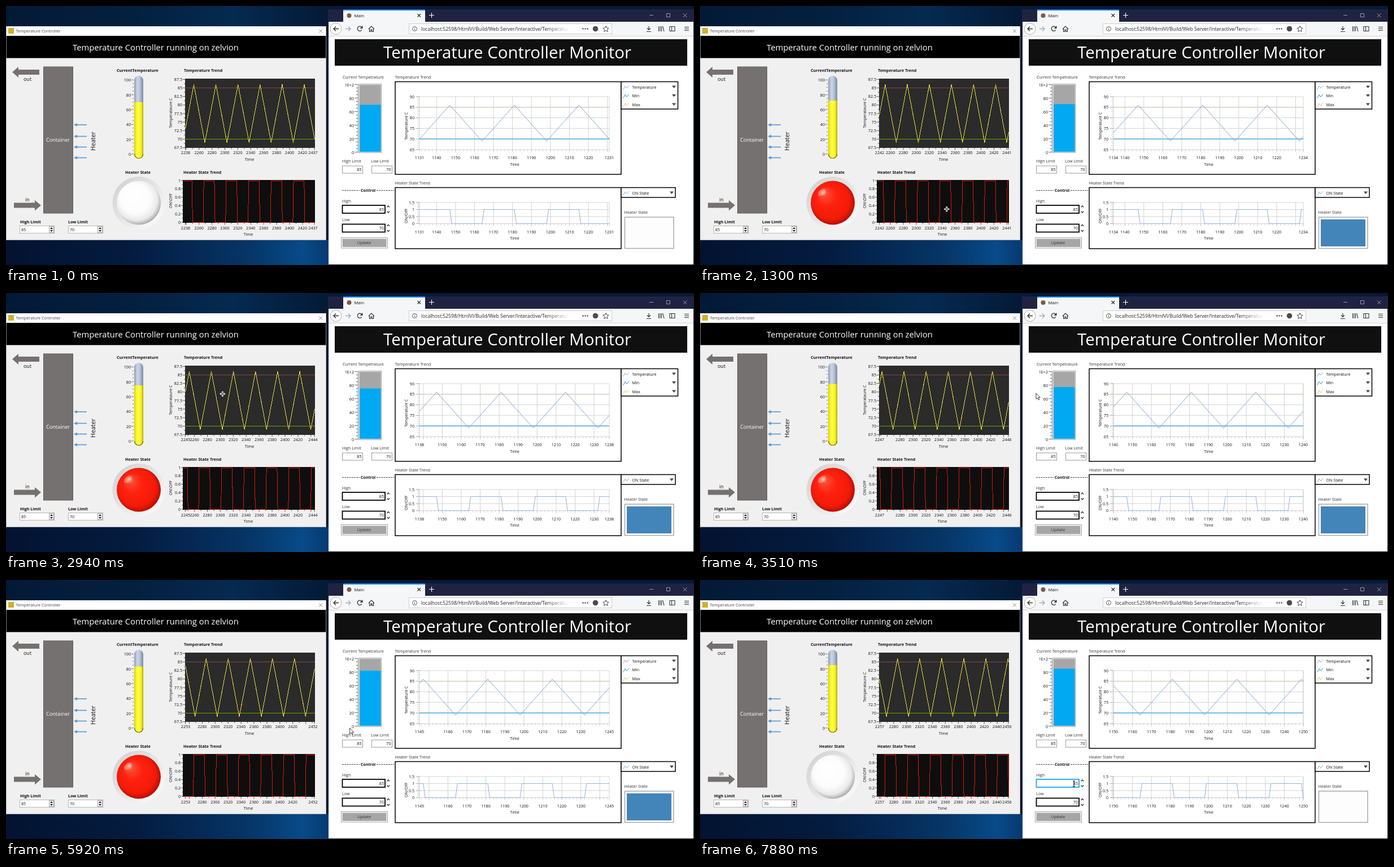
Animation of 1218 by 460 pixels, one loop 8000 ms. Source, as an HTML page:

```html
<!DOCTYPE html>
<html lang="en">
<head>
<meta charset="utf-8">
<title>Temperature Controller</title>
<style>
html, body { margin: 0; width: 100%; height: 100%; overflow: hidden; background: #04132b; }
svg { display: block; width: 1218px; height: 460px; font-family: "Open Sans", "Noto Sans", sans-serif; }
text { white-space: pre; }
.crisp { shape-rendering: crispEdges; }
</style>
</head>
<body>
<svg id="stage" viewBox="0 0 1218 460" xmlns="http://www.w3.org/2000/svg"></svg>
<script>
const LOOP = 8000;
const LAG = 80; // the web page trails the desktop panel
const STEPS = [70, 430, 830, 1270, 1700, 2070, 2560, 2990, 3430, 3830, 4240, 4660, 5050, 5480, 5920, 6380, 6810, 7270, 7710];
const CURSOR = [[990, 520, 438], [1300, 437, 361], [2150, 263, 157], [2510, 223, 180], [3510, 595, 178], [4130, 590, 139],
  [4820, 493, 163], [6220, 640, 290], [6380, 640, 290], [6950, 677, 333], [7490, 662, 362]];

// Sample counters of the two programs differ by a constant.
const OFFSET = 1206;
const temperature = n => { const d = (n - 8) % 34; return 69 + Math.min(d, 34 - d); };
const heater = n => { const d = n % 34; return d > 8 && d < 26 ? 1 : 0; };

// Value-to-pixel scales
const thermoY = v => 262.8 - v * 1.315;
const tankY = v => 259.5 - v * 1.2;
const deskTempY = v => 251.6 - (v - 67.5) * 6.06;

const range = (a, b, step = 1) => Array.from({ length: Math.floor((b - a) / step + 1e-6) + 1 }, (_, i) => a + i * step);
const each = (list, fn) => list.map(fn).join('');
const rect = (x, y, w, h, fill, extra = '') => `<rect x="${x}" y="${y}" width="${w}" height="${h}" fill="${fill}" ${extra}/>`;
const box = (x, y, w, h, stroke, width = 1, fill = '#fff') => rect(x, y, w, h, fill, `stroke="${stroke}" stroke-width="${width}"`);
const path = (d, stroke, width = 1, extra = '') => `<path d="${d}" fill="none" stroke="${stroke}" stroke-width="${width}" ${extra}/>`;
const shape = (d, fill, extra = '') => `<path d="${d}" fill="${fill}" ${extra}/>`;
const label = (x, yMid, str, { size = 7.15, anchor = 'start', fill = '#111', bold = false, turn = false } = {}) =>
  `<text x="${x}" y="${yMid + size * 0.36}" font-size="${size}" text-anchor="${anchor}" fill="${fill}"` +
  `${bold ? ' font-weight="700"' : ''}${turn ? ` transform="rotate(-90 ${x} ${yMid})"` : ''}>${str}</text>`;
const mid = { anchor: 'middle' }, end = { anchor: 'end' }, bold = { bold: true }, upright = { anchor: 'middle', turn: true };
const gradient = (id, stops, attrs, kind = 'linear') => `<${kind}Gradient id="${id}" ${attrs}>` +
  each(stops, ([o, c, a = 1]) => `<stop offset="${o}" stop-color="${c}" stop-opacity="${a}"/>`) + `</${kind}Gradient>`;

const defs = `<defs>
${gradient('sky', [[0, '#031a36'], [.4, '#04203f'], [.7, '#052a50'], [1, '#041a36']], '')}
${gradient('floor', [[0, '#031330'], [.4, '#041c40'], [.75, '#063566'], [.92, '#084a88'], [1, '#063a70']], '')}
${gradient('ring', [[0, '#cfcfcf'], [.45, '#e3e3e3'], [1, '#ffffff']], 'x1="0" y1="0" x2="1" y2="1"')}
${gradient('red', [[0, '#ffb09a'], [.13, '#ff4a30'], [.4, '#ff2110'], [.78, '#f21a08'], [1, '#980a00']], 'cx=".5" cy=".5" r=".56" fx=".27" fy=".25"', 'radial')}
${gradient('white', [[0, '#ffffff'], [.6, '#fcfcfc'], [.84, '#eaeaea'], [1, '#a8a8a8']], 'cx=".46" cy=".44" r=".57" fx=".36" fy=".33"', 'radial')}
${gradient('glass', [[0, '#8f9cb2'], [.35, '#cbd6e8'], [.6, '#b9c6dc'], [1, '#7c889e']], '')}
${gradient('yellow', [[0, '#d0c800'], [.2, '#f9f428'], [.5, '#ffff48'], [.8, '#f6ec10'], [1, '#aaa000']], '')}
${gradient('fade', [[0, '#fff', 0], [1, '#fff']], '')}
<clipPath id="tube">${rect(227, 124, 16, 147, '#000', 'rx="8"')}</clipPath>
</defs>`;

const desktop = rect(0, 0, 1218, 460, '#04132b') + rect(0, 0, 571, 36, 'url(#sky)') + rect(0, 416, 571, 44, 'url(#floor)') +
  rect(570, 0, 648, 6, '#041a38');

function stepper(x, y, value) {
  return box(x + .5, y + .5, 61, 13, '#b5b5b5') + label(x + 3, y + 7, value) +
    box(x + 52.5, y + 1.5, 8, 11, '#aaa', 1, '#eee') +
    shape(`M${x + 54} ${y + 6}h5l-2.5 -3zM${x + 54} ${y + 8}h5l-2.5 3z`, '#222');
}

function panel() {
  const arrow = y => path(`M143 ${y}H123`, '#5b9bd5', 1.7) + shape(`M120 ${y}l6 -3v6z`, '#5b9bd5');
  return rect(0, 36, 567, 380, '#f0f0f0') + rect(0, 36, 567, 17, '#fff') + rect(4, 39, 10, 10, '#d0b02c') +
    label(17.5, 44.5, 'Temperature Controller', { size: 7.25, fill: '#444' }) +
    path('M554 41.5l6 6m0 -6l-6 6', '#777', .9) +
    rect(0, 53, 567, 39.5, '#000') +
    label(118, 74, 'Temperature Controller running on zelvion', { size: 14.8, fill: '#fff' }) +
    rect(66.5, 108, 52, 260, '#767171', 'stroke="#635e5e"') +
    label(92, 238, 'Container', { ...mid, size: 9.2, fill: '#fff' }) +
    shape('M11 117.5L22 108v5H59v9H22v5z', '#767171') + label(38, 130, 'out', { ...mid, size: 9 }) +
    shape('M62 354L51 345v4.5H14v9H51v5z', '#767171') + label(38, 343.5, 'in', { ...mid, size: 9 }) +
    each([211, 231.5, 250.5, 269.5], arrow) +
    label(154.5, 240, 'Heater', { ...upright, size: 10.7 }) +
    label(196, 114.5, 'CurrentTemperature', bold) +
    each(range(0, 100, 20), v => label(221, thermoY(v) + .5, v, end)) +
    path(each(range(0, 100, 5), v => `M${v % 20 ? 224 : 222} ${thermoY(v)}H226`), '#555', .8) +
    rect(227, 124, 16, 147, 'url(#glass)', 'rx="8"') +
    '<g clip-path="url(#tube)"><rect id="mercury" x="227" width="16" fill="url(#yellow)"/></g>' +
    path('M227.5 263a7.5 7.5 0 0 0 15 0', '#6d6700', 1.2) +
    label(211, 295, 'Heater State', bold) +
    '<circle cx="235" cy="349.5" r="46.5" fill="url(#ring)"/><circle id="bulb" cx="235" cy="349.5" r="39"/>' +
    '<ellipse cx="216" cy="331" rx="8" ry="5" fill="#fff" opacity=".3" transform="rotate(-40 216 331)"/>' +
    label(25, 383.5, 'High Limit', bold) + stepper(24, 390, 85) +
    label(110, 383.5, 'Low Limit', bold) + stepper(110, 390, 70) +
    label(315, 114.5, 'Temperature Trend', bold) + label(291, 190, 'Temperataure C', upright) +
    rect(317, 129, 230, 123, '#2b2b2b') +
    each(range(67.5, 87.5, 2.5), v => label(312, deskTempY(v), v, end)) +
    path(each(range(67.5, 87.5, 1.25), v => `M${v % 2.5 ? 315 : 313} ${deskTempY(v)}H317`), '#333', .8) +
    path(`M317 ${deskTempY(85)}H547`, '#84484a', 1, 'class="crisp"') +
    path(`M317 ${deskTempY(70)}H547`, '#62a800', 1, 'class="crisp"') +
    path('', '#e0d840', 1, 'id="deskTemp" class="crisp"') + label(431, 272, 'Time', mid) +
    label(314, 295, 'Heater State Trend', bold) + label(291, 346, 'ON\\OFF', upright) +
    rect(313, 309, 234, 76, '#0e0e0e') +
    each(range(0, 5), i => label(309, 384 - i * 14.8, i / 5, end)) +
    path(each(range(0, 10), i => `M${i % 2 ? 311.5 : 310} ${384 - i * 7.4}H313`), '#333', .8) +
    path('', '#e0140c', 1, 'id="deskState" class="crisp"') + label(429, 405, 'Time', mid) +
    '<g id="deskAxis"></g>' + path('M566.5 36V416M0 415.5H567M.5 36V416', '#9aa2ab', .8);
}

function browser() {
  const ink = '#333';
  return rect(571, 6, 646, 453, '#fff') + rect(570, 6, 648, 22, '#1f2341') +
    rect(597, 6, 145, 22, '#f5f6f7') + rect(597, 6, 145, 2, '#0a84ff') +
    '<circle cx="607.5" cy="17" r="4" fill="#7b5c4a"/>' +
    label(616.5, 17, 'Main', { size: 7.6 }) + path('M728.5 14l5.5 5.5m0 -5.5l-5.5 5.5', '#222', 1.1) +
    path('M749 16.5h9m-4.5 -4.5v9', '#fff', 1.1) +
    path('M1139 16.5h7M1169.5 13.5h6v6h-6zM1199 13.5l6.5 6.5m0 -6.5l-6.5 6.5', '#b8b8c4', .8) +
    rect(571, 28, 646, 26, '#f5f6f7') +
    '<circle cx="584" cy="40.5" r="10" fill="#fff" stroke="#b0b0b4"/>' +
    path('M589 40.5h-9m4 -4l-4 4l4 4', ink, 1.4) + path('M601 40.5h9m-4 -4l4 4l-4 4', '#aaa', 1.3) +
    path('M630 38a4.2 4.2 0 1 0 0 4.5', ink, 1.3) + shape('M631.5 35v5h-5z', ink) +
    path('M642 41l5 -5l5 5M643.5 40.5v5h2.5v-3.5h2v3.5h2.5v-5', ink, 1.2) +
    box(713.5, 31.5, 359, 18, '#ccc') +
    '<circle cx="723.5" cy="40.5" r="4" fill="none" stroke="#555"/>' + path('M723.5 40v3m0 -5.5v1', '#555') +
    label(735, 40.5, 'localhost:52598/HtmlVI/Build/Web Server/Interactive/Temperatur', { size: 8.6, fill: '#222' }) +
    rect(955, 33, 44, 15, 'url(#fade)') + rect(999, 33, 18, 15, '#fff') +
    each([1021.5, 1025.5, 1029.5], x => `<circle cx="${x}" cy="40.5" r="1.2" fill="#444"/>`) +
    '<circle cx="1043.5" cy="40.5" r="4.8" fill="#4a4a4f"/>' +
    path('M1062 35.5l1.5 3.4l3.7 .4l-2.8 2.5l.8 3.7l-3.2 -1.9l-3.2 1.9l.8 -3.7l-2.8 -2.5l3.7 -.4z', '#444') +
    path('M1138 36v6m-3 -2.5l3 3l3 -3M1134 45.5h8', ink, 1.2) +
    path('M1155.5 36v9m2.5 -9v9m2.5 -9v9m2 -9l2.5 9', ink, 1.1) +
    path('M1175 36.5h9v8h-9zM1178.5 36.5v8', ink, 1.1) + path('M1201 37.5h8m-8 3h8m-8 3h8', ink, 1.2) +
    path('M571 53.5H1217', '#d5d5d8') +
    rect(582, 59, 624, 47, '#101010') +
    label(668, 82.5, 'Temperature Controller Monitor', { size: 29.4, fill: '#fff' });
}

// Evenly spaced grid rows from the top value down.
function gridRows(top, low, step, y, gap) {
  return range(0, (top - low) / step).map(i => ({ v: top - i * step, y: y + i * gap }));
}

function plot(x, y, w, h, rows, scale, minor, axisLabel, name) {
  const top = rows[0], low = rows[rows.length - 1];
  const yAt = v => low.y - (v - low.v) * scale;
  return box(x, y, w, h, '#000', 1.5) + path(each(rows, g => `M732 ${g.y}H1068`), '#d0d0d0', .9) +
    `<g id="${name}Axis"></g>` +
    each(rows, g => label(723, g.y, g.v, end)) +
    path(each(range(low.v, top.v, minor), v => `M728.5 ${yAt(v)}H732`), '#b5b5b5', .7) +
    path(each(rows, g => `M725.5 ${g.y}H732`), '#999', .8) +
    label(708.5, (top.y + low.y) / 2 + 5, axisLabel, upright);
}

function legend(y, name, color, right) {
  return path(`M1093 ${y + 4}l3 -6l3 4l4 -5`, color, 1) + label(1108.5, y, name) +
    shape(`M${right - 11} ${y - 2.5}h7l-3.5 4.5z`, '#444');
}

function field(y, value, id) {
  return `<rect id="${id}" x="595.5" y="${y}" width="75.5" height="14" fill="#fff" stroke="#000" stroke-width="1.8"/>` +
    label(669, y + 7, value, end) +
    path(`M674.5 ${y + 3.5}l2.3 -2.5l2.3 2.5m-4.6 7l2.3 2.5l2.3 -2.5`, '#333', 1.2);
}

function monitor() {
  const limit = (x, value) => box(x, 284, 36, 13, '#999') + label(x + 34, 290.5, value, end);
  const text = (x, y, s) => label(x, y, s, { fill: '#333' });
  return text(596, 126.5, 'Current Tempetrature') + text(688.5, 126.5, 'Temperature Trend') +
    each(range(0, 100, 20), v => label(616, tankY(v) + .5, v === 100 ? '1E+2' : v, end)) +
    path(each(range(0, 100, 5), v => `M${v % 20 ? 620 : 617.5} ${tankY(v)}H623`), '#444', .8) +
    path('M623 140V260', '#888', .8) +
    box(624.5, 138.5, 40, 122, '#aaa', 1, '#e8e8e8') + rect(626, 140, 37.5, 119, '#a6a6a6') +
    '<rect id="tank" x="626" width="37.5" fill="#00a9f1"/>' +
    text(595, 275, 'High Limit') + limit(595.5, 85) + text(646, 275, 'Low Limit') + limit(647.5, 70) +
    path('M595 327.5H626M656 327.5H687', '#333', .9, 'stroke-dasharray="3 1.2"') +
    label(641, 327, 'Control', { ...mid, ...bold }) +
    text(595, 346, 'High') + field(354, 85, 'high') + text(595, 379.5, 'Low') + field(387.5, 70, 'low') +
    box(593.5, 411.5, 82, 18.5, '#a0a0a0') + rect(595.5, 413.5, 78, 14.5, '#a6a6a6') + label(634, 420.8, 'Update', { ...mid, fill: '#333' }) +
    plot(689, 134.5, 400, 164.5, gridRows(90, 65, 5, 161, 18.8), 3.76, 1, 'Temperature C', 'webTemp') +
    path('M732 179.8H1068', '#d6c6aa', 1.1) + path('M732 236.2H1068', '#37a0d8', 1.2) +
    path('', '#7da4d8', 1, 'id="webTemp"') + label(900.5, 281, 'Time', mid) +
    box(1089, 134.5, 100.5, 48.5, '#000', 1.5) + legend(144, 'Temperature', '#8eb0dc', 1190) +
    legend(159.5, 'Min', '#2196d8', 1190) + legend(175, 'Max', '#f2c078', 1190) +
    text(688.5, 314.5, 'Heater State Trend') +
    plot(689, 322.5, 400, 108.5, gridRows(1.5, 0, .5, 349, 12.5), 25, .1, 'ON/OFF', 'webState') +
    path('', '#8fb0e0', 1, 'id="webState"') + label(900.5, 412, 'Time', mid) +
    box(1089, 322.5, 96, 17.5, '#000', 1.5) + legend(332, 'ON State', '#8eb0dc', 1186) +
    text(1094.5, 366.5, 'Heater State') + box(1095.5, 375, 86.5, 55.5, '#a3a3a3', 1.4, '#fdfdfd') +
    rect(1099, 379, 79, 48, '#4385b8', 'id="lamp"');
}

const stage = document.getElementById('stage');
stage.innerHTML = defs + desktop + panel() + browser() + monitor() + '<g id="cursor"></g>';
const $ = id => document.getElementById(id);
const set = (id, attrs) => Object.entries(attrs).forEach(([k, v]) => $(id).setAttribute(k, v));
const trace = (first, count, xAt, yAt) => 'M' + range(0, count).map(i => `${xAt(i).toFixed(1)} ${yAt(first + i).toFixed(1)}`).join('L');
const marks = (first, last, step) => range(Math.ceil(first / step) * step, last, step);
const apart = (first, last, gap) => n => n - first >= gap && last - n >= gap;

function drawDesk(count) {
  const first = 2238 + count, last = first + 199;
  set('deskTemp', { d: trace(first, 199, i => 317.5 + i * 229 / 199, n => deskTempY(temperature(n - OFFSET))) });
  set('deskState', { d: trace(first, 199, i => 314 + i * 232.5 / 199, n => 384.5 - heater(n - OFFSET) * 74) });
  const xAt = n => 316.5 + (n - first) * 1.145;
  const ticks = marks(first, last, 10);
  const names = marks(first, last, 20).filter(apart(first, last, 14));
  $('deskAxis').innerHTML = each([[252, 260.5], [385, 394]], ([edge, y]) =>
    path(each(ticks, n => `M${xAt(n)} ${edge}v${n % 20 ? 2 : 3.5}`) + `M317.5 ${edge}v3.5M546 ${edge}v3.5`, '#333', .8) +
    each(names, n => label(xAt(n), y, n, mid)) + label(318, y, first, mid) + label(543.5, y, last, mid));
  const now = last - OFFSET, level = thermoY(temperature(now));
  set('mercury', { y: level, height: 272 - level });
  set('bulb', { fill: heater(now) ? 'url(#red)' : 'url(#white)' });
}

function drawWeb(count) {
  const first = 1131 + count, last = first + 100;
  const xAt = n => 732 + (n - first) * 3.36;
  set('webTemp', { d: trace(first, 100, i => 732 + i * 3.36, n => 255 - (temperature(n) - 65) * 3.76) });
  set('webState', { d: trace(first, 100, i => 732 + i * 3.36, n => 386.5 - heater(n) * 25) });
  const tens = marks(first, last, 10), names = tens.filter(apart(first, last, 6));
  for (const [id, top, low] of [['webTempAxis', 161, 255], ['webStateAxis', 349, 386.5]]) {
    $(id).innerHTML = path(each([first, ...tens, last], n => `M${xAt(n)} ${top}V${low + 5}`), '#d0d0d0', .9) +
      path(each(marks(first, last, 2), n => `M${xAt(n)} ${low}v3`), '#b5b5b5', .7) +
      each([first, ...names, last], n => label(xAt(n), low + 14.5, n, mid));
  }
  const level = tankY(temperature(last));
  set('tank', { y: level, height: 259 - level });
  set('lamp', { opacity: heater(last) });
}

const inside = (x, y, l, t, r, b) => x >= l && x <= r && y >= t && y <= b;

function drawCursor(t) {
  if (t < CURSOR[0][0]) { $('cursor').innerHTML = ''; return; }
  const next = CURSOR.findIndex(k => k[0] > t);
  const b = next < 0 ? CURSOR[CURSOR.length - 1] : CURSOR[next];
  const a = next < 0 ? b : CURSOR[next - 1];
  const f = a === b ? 0 : (t - a[0]) / (b[0] - a[0]);
  const x = a[1] + (b[1] - a[1]) * f, y = a[2] + (b[2] - a[2]) * f;
  let art;
  if (inside(x, y, 317, 130, 547, 252) || inside(x, y, 314, 309, 547, 385)) {
    art = path('M-4.5 0h9M0 -4.5v9', '#fff', 2.6) + path('M-3 0h6M0 -3v6', '#222', .9);
  } else if (inside(x, y, 595, 354, 671, 368)) {
    art = path('M-2 -5h4M0 -5V5M-2 5h4', '#111', 1);
  } else {
    art = shape('M0 0V10.5L2.4 8.3L4 12L5.7 11.3L4.1 7.7H7.3Z', '#fff', 'stroke="#111" stroke-width=".8"');
  }
  $('cursor').innerHTML = `<g transform="translate(${x} ${y})">${art}</g>`;
}

let deskCount = -1, webCount = -1;
function render(t) {
  const passed = time => STEPS.filter(s => s <= time).length;
  const desk = passed(t), web = passed(t - LAG);
  if (desk !== deskCount) drawDesk(deskCount = desk);
  if (web !== webCount) drawWeb(webCount = web);
  set('high', { stroke: t >= 7880 ? '#14a9ec' : '#000' });
  drawCursor(t);
}

const start = performance.now();
function tick() {
  render((performance.now() - start) % LOOP);
  requestAnimationFrame(tick);
}
tick();
</script>
</body>
</html>
```
